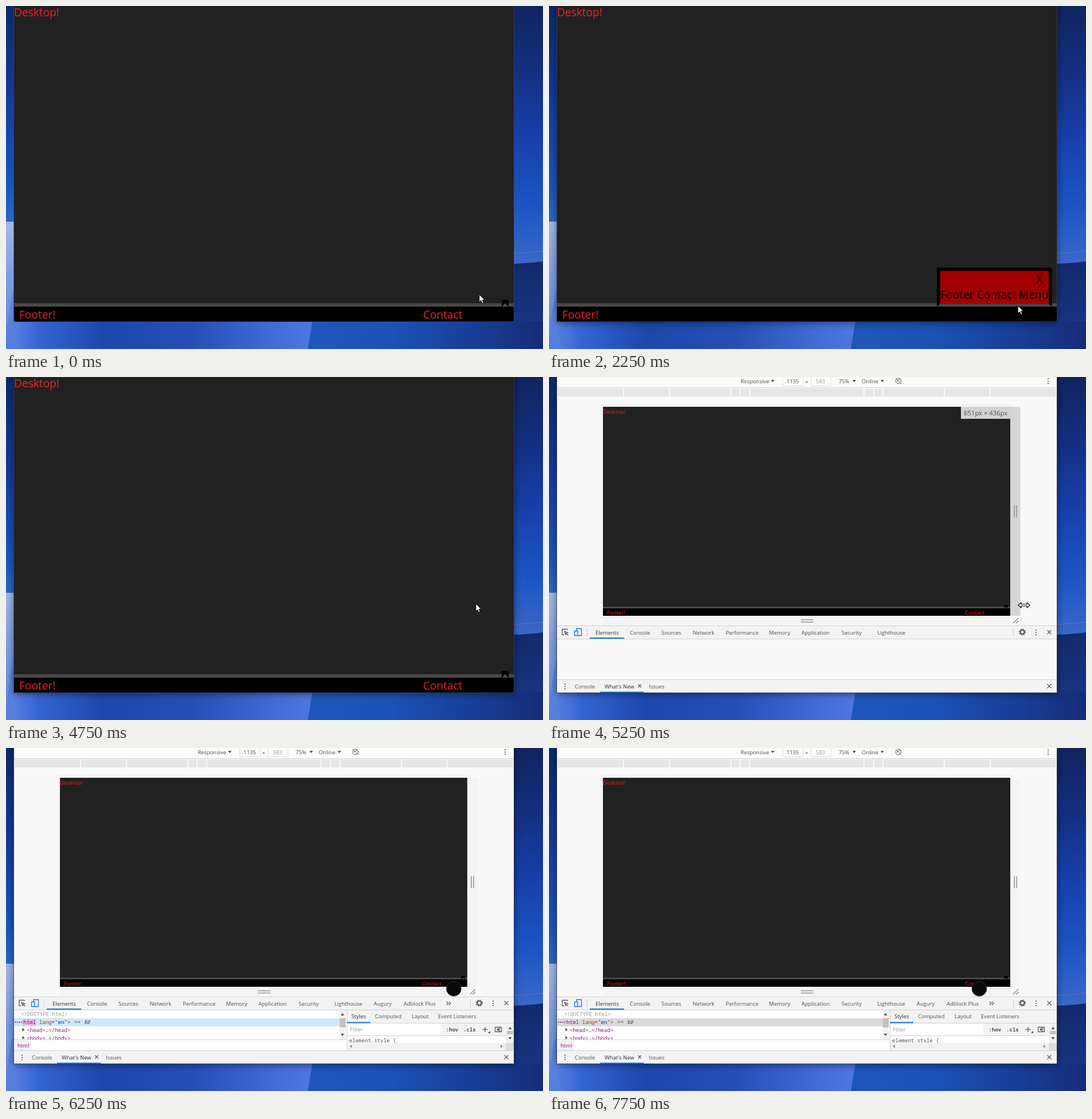
An HTML page that plays this animation: 936x599 px, repeating every 8 s.

```html
<!DOCTYPE html>
<html lang="en">
<head>
<meta charset="utf-8">
<title>Footer menu</title>
<style>
  html, body { margin: 0; width: 100%; height: 100%; overflow: hidden; background: #1c4cae; }
  svg { display: block; width: 936px; height: 599px; }
  text { font: 9.45px "Open Sans", "Noto Sans", sans-serif; fill: #505050; white-space: pre; }
  .page text { font-size: 19.1px; fill: #e9222a; }
  .page .menu text { fill: #000; }
  text.mono { font: 9.1px "Noto Sans Mono", "DejaVu Sans Mono", monospace; }
  text.size { font-size: 11.3px; fill: #555; }
  text.dark { fill: #303030; }
  text.pale { fill: #999; }
  text.bold { font-weight: 700; }
  .tag { fill: #881280; } .attr { fill: #994500; } .value { fill: #1a1aa6; }
  .line { stroke: #d0d0d0; fill: none; }
  .icon { stroke: #606060; fill: none; stroke-width: 1.3; }
</style>
</head>
<body>
<svg viewBox="0 0 936 599">
  <defs>
    <linearGradient id="left" x2="0" y2="1">
      <stop stop-color="#10296b"/><stop offset=".25" stop-color="#15399b"/>
      <stop offset=".52" stop-color="#1b55b7"/><stop offset=".628" stop-color="#2d67c3"/>
      <stop offset=".63" stop-color="#a3b7e8"/><stop offset=".78" stop-color="#839fdf"/>
      <stop offset="1" stop-color="#5c83e2"/>
    </linearGradient>
    <linearGradient id="bottom">
      <stop stop-color="#6288e4"/><stop offset=".06" stop-color="#3565d4"/>
      <stop offset=".18" stop-color="#1d47ab"/><stop offset=".35" stop-color="#264fb6"/>
      <stop offset=".5" stop-color="#426cd6"/><stop offset=".565" stop-color="#4d77df"/>
      <stop offset=".6" stop-color="#1f56ba"/><stop offset=".72" stop-color="#1c51b5"/>
      <stop offset=".86" stop-color="#18409a"/><stop offset="1" stop-color="#152c76"/>
    </linearGradient>
    <linearGradient id="right" x2="0" y2="1">
      <stop stop-color="#11245f"/><stop offset=".25" stop-color="#132f80"/>
      <stop offset=".5" stop-color="#173fa9"/><stop offset=".78" stop-color="#1c55c4"/>
      <stop offset="1" stop-color="#3c68c8"/>
    </linearGradient>
    <linearGradient id="corner" x2="0" y2="1">
      <stop stop-color="#14296c"/><stop offset="1" stop-color="#183581"/>
    </linearGradient>
    <filter id="blur" x="-10%" y="-10%" width="120%" height="120%"><feGaussianBlur stdDeviation="7"/></filter>
    <clipPath id="tree"><path d="M14 458H885V509H14Z"/></clipPath>
    <clipPath id="styles"><path d="M595 503H872V515H595Z"/></clipPath>
  </defs>

  <rect width="936" height="599" fill="url(#bottom)"/>
  <path d="M534 551L526 599H560V551Z" fill="#1f56ba"/>
  <rect width="14" height="599" fill="url(#left)"/>
  <path d="M14 490Q6 525 0 575V599H14Z" fill="#4d78dd" opacity=".55"/>
  <rect x="885" width="51" height="451" fill="url(#right)"/>
  <path d="M885 432Q912 431 936 428" stroke="#5a82d8" fill="none" opacity=".7"/>
  <path d="M885 450Q912 449 936 446V551H885Z" fill="url(#corner)"/>
  <rect id="shadow" x="14" y="-20" width="871" height="573" opacity=".5" filter="url(#blur)"/>
  <g id="browser"></g>
  <g id="devtools"></g>
  <g id="cursor">
    <path id="arrow" d="M0 0V13L3 10.3L5 15L7.2 14L5.2 9.5H9Z" fill="#fff" stroke="#000" stroke-width=".8"/>
    <path id="resize" d="M-10 0L-5 -4.5V-1.5H5V-4.5L10 0L5 4.5V1.5H-5V4.5Z" fill="#fff" stroke="#000" stroke-width="1.1"/>
    <circle id="touch" r="12.8" fill="#080808" stroke="#303030" stroke-width="1"/>
  </g>
</svg>
<script>
const $ = id => document.getElementById(id);
const text = (x, y, s, cls = "") => `<text x="${x}" y="${y}" class="${cls}">${s}</text>`;
const box = (x, y, w, h, fill, extra = "") => `<rect x="${x}" y="${y}" width="${w}" height="${h}" fill="${fill}" ${extra}/>`;
const path = (d, cls, extra = "") => `<path d="${d}" class="${cls}" ${extra}/>`;
const labels = (y, items, cls) => items.map(([x, s]) => text(x, y, s, cls)).join("");
const triangle = (x, y, dx, dy) => // small arrow head pointing along dx, dy
  path(`M${x + dx * 2} ${y + dy * 2}L${x - dx * 2 - dy * 3} ${y - dy * 2 - dx * 3}L${x - dx * 2 + dy * 3} ${y - dy * 2 + dx * 3}Z`, "", 'fill="#505050"');
const dots = (x, y) => [-4, 0, 4].map(d => `<circle cx="${x}" cy="${y + d}" r="1.1" fill="#555"/>`).join("");
const cross = (x, y, r) => path(`M${x - r} ${y - r}l${2 * r} ${2 * r}m0 ${-2 * r}l${-2 * r} ${2 * r}`, "icon");

// The web page itself, drawn in its own units with the origin at its top left.
function page(x, y, width, height, scale, footerX, menu = "") {
  const bar = height - 32;
  return `<g class="page" transform="translate(${x} ${y}) scale(${scale})">
    ${box(0, 0, width, height, "#212121")}
    ${box(0, bar, width, 6, "#484848")}${box(0, bar + 6, width, 26, "#000")}
    ${text(0, 23, "Desktop!")}${text(footerX, height - 5, "Footer!")}
    <g class="toggle">${text(width - 158, height - 5, "Contact")}
      ${box(width - 21, bar - 6, 12, 12, "#000")}
      ${path(`M${width - 20.5} ${bar + 6}l5.5 -6l5.5 6Z`, "", 'fill="#505050"')}</g>
    ${menu}</g>`;
}

const menu = `<g class="menu" id="menu" transform="translate(-14 5.5)">
  ${box(676, 457, 200.5, 68, "#000")}${box(682, 462.5, 189, 57.5, "#a00000")}
  ${path("M676 525L682 520H871L876.5 525Z", "", 'fill="#484848"')}
  ${text(849.5, 484, "X")}${text(682.5, 511, "Footer Contact Menu")}</g>`;
$("browser").innerHTML = page(14, -5.5, 871, 556.5, 1, 9, menu) +
  path("M13.5 0V551.5H885.5V0", "", 'stroke="#3c4560" fill="none" stroke-width=".7"');

const deviceBar = box(14, 0, 871, 551, "#f9f9f9") + box(14, 0, 871, 18, "#fcfcfc") +
  path("M14 18.5H885", "line") + box(15, 20, 869, 14, "#e6e6e6") +
  path([130, 210, 317, 333, 350, 549, 566, 582, 689, 769].map(x => `M${x} 20v14`).join(""), "", 'stroke="#fff" stroke-width="1.5"') +
  path("M407.5 0V15.5H443.5V0M456.5 0V15.5H491.5V0", "line", 'stroke-opacity=".7"') +
  labels(10.5, [[334, "Responsive"], [414, "1135"], [505, "75%"], [545, "Online"]]) +
  text(465, 10.5, "583", "pale") + text(446.5, 11.5, "×") +
  [390, 532, 581].map(x => triangle(x, 7, 0, 1)).join("") +
  `<circle cx="609" cy="7" r="4.8" class="icon" style="stroke-width:1"/>` +
  path("M604 2l10 10M606 8l5 -5l2 2", "icon", 'style="stroke-width:1"') + dots(870, 7);

const device = box(89, 47, 720, 375, "#f3f3f3") + box(804, 52, 17.5, 365, "#f4f4f4") +
  box(94, 417, 710, 16, "#f4f4f4") +
  `<g id="sizing">${box(804, 52, 17.5, 365, "#d5d5d5")}</g>` +
  page(94, 52, 1420, 730, .5, 14.5) +
  `<g id="sizeLabel">${box(718, 52, 86, 21, "#d2d2d2")}${text(723, 67, "851px × 436px", "size")}</g>` +
  path("M811.2 224v21M815.2 224v21M439 424h22M439 428h22M809 430l9 -9M813.5 430.5l5 -5", "", 'stroke="#969696" stroke-width="1.6"');

const tabs = box(14, 434, 871, 24, "#f3f3f3") + path("M14 434.5H885M14 457.5H885M66.5 439v14M809.5 439v14", "line") +
  box(71, 455, 60, 2, "#1a73e8") + text(81, 449.5, "Elements", "dark") +
  labels(449.5, [[141, "Console"], [196, "Sources"], [250.5, "Network"], [308, "Performance"], [383.5, "Memory"],
    [440, "Application"], [510, "Security"], [572.5, "Lighthouse"]]) +
  path("M32 442V440.5H23V450H26M27 444l6 2.5l-3 1l3.5 3.5M27 444l2 6l1.5 -2.5", "icon") +
  path("M48 443V439.5H56.5V451.5H50M44.5 443.5H50V451.5H44.5Z", "icon", 'style="stroke:#1a73e8"') +
  `<circle cx="825" cy="445.5" r="3.6" class="icon" style="stroke-width:2.4"/>
   <circle cx="825" cy="445.5" r="5.2" class="icon" style="stroke-width:1.8" stroke-dasharray="2 2.08"/>` +
  dots(849, 446) + cross(872, 445.5, 3.5);

const drawer = box(14, 528, 871, 23, "#f3f3f3") + path("M14 528.5H885", "line") + dots(28, 540.5) +
  labels(544, [[45, "Console"], [174, "Issues"]]) + text(97, 544, "What's New", "dark") +
  cross(158, 539.5, 2.7) + cross(872, 540, 3.5) + box(89, 549.5, 76, 1.5, "#1a73e8");

const span = (cls, s) => `<tspan class="${cls}">${s}</tspan>`;
const element = (name, gap) => span("tag", `&lt;${name}&gt;`) + gap + span("tag", `&lt;/${name}&gt;`);
const inspector = `<g id="inspector">
  ${labels(449.5, [[641, "Augury"], [693, "Adblock Plus"]])}
  ${path("M768 443l3 3l-3 3M772 443l3 3l-3 3M835 465.5l3 3l-3 3M839 465.5l3 3l-3 3", "icon")}
  <g clip-path="url(#tree)">${box(14, 458, 580, 51, "#fff")}
    <rect id="selected" x="14" y="472" width="567" height="14"/>
    ${text(26, 468, "&lt;!DOCTYPE html&gt;", "mono pale")}
    ${text(15, 481.5, "•••", "")}
    <rect id="flash" x="29.5" y="473" width="23" height="12" fill="#e9bddd"/>
    ${text(25, 482, span("tag", "&lt;html") + span("attr", " lang") + span("tag", '="') + span("value", "en") + span("tag", '"&gt;'), "mono")}
    ${text(119, 482, '== <tspan font-style="italic">$0</tspan>', "mono")}
    ${triangle(30.5, 492, 1, 0)}${text(36, 496, element("head", "…"), "mono")}
    ${triangle(30.5, 506, 1, 0)}${text(36, 510, element("body", "…"), "mono")}
    ${box(581, 458, 12, 51, "#f1f1f1")}${box(581.5, 472, 10.5, 16, "#c1c1c1")}
    ${triangle(586.5, 465, 0, -1)}${triangle(586.5, 501, 0, 1)}</g>
  ${box(14, 509, 580, 19, "#fff")}${path("M14 509.5H594", "line")}
  ${box(15, 511, 29, 17, "#f1f1f1")}<text x="20" y="523" style="fill:#881280">html</text>
  ${box(594, 458, 291, 70, "#f3f3f3")}${path("M594.5 458V528M594 480.5H885M594 502.5H872", "line")}
  ${box(594, 478.5, 41, 2, "#1a73e8")}${text(602, 472, "Styles", "dark")}
  ${labels(472, [[643, "Computed"], [707, "Layout"], [753, "Event Listeners"]])}
  ${box(595, 481, 162, 21, "#fff")}${text(599.5, 495, "Filter", "pale")}
  ${labels(494.5, [[766.5, ":hov"], [797, ".cls"]], "mono bold")}
  ${path("M830.5 491.5h9M835 487v9M852.5 487.5h11v8h-11ZM860.5 487.5v8", "icon")}
  ${path("M844 494v4h-4Z", "", 'fill="#505050"')}${path("M859 488.5v6l-4 -3Z", "", 'fill="#505050"')}
  ${box(595, 503, 277, 12, "#fff")}<g clip-path="url(#styles)">${text(598, 513.5, "element.style {", "mono")}</g>
  ${box(595, 515, 276, 13, "#f1f1f1")}${box(872, 481, 13, 34, "#f1f1f1")}${box(871, 515, 14, 13, "#dcdcdc")}
  ${box(873, 494, 11, 6, "#c1c1c1")}
  ${triangle(878.5, 489, 0, -1)}${triangle(878.5, 507, 0, 1)}
  <g opacity=".6">${triangle(601, 521, -1, 0)}${triangle(864, 521, 1, 0)}</g>
</g>`;
$("devtools").innerHTML = deviceBar + device + tabs + inspector + drawer;

// time, x, y
const pointer = [
  [0, 825, 504], [1000, 766, 535], [1250, 762, 538], [1750, 772, 538], [2000, 772, 538],
  [2250, 817.5, 523.5], [2500, 846, 492], [2750, 855, 475], [3000, 855, 475], [3250, 845, 468],
  [3500, 806, 445], [3750, 785, 411], [4250, 816, 395], [4500, 816, 395], [4750, 819, 396],
  [5250, 828, 398.5], [5750, 824, 399], [6000, 804, 411], [6250, 780.5, 420.5], [7000, 766, 421],
  [7750, 750, 420.5], [8000, 750, 420.5]
];
function pointerAt(t) {
  const i = pointer.findIndex(k => k[0] > t);
  const [t0, x0, y0] = pointer[i - 1], [t1, x1, y1] = pointer[i];
  const p = (t - t0) / (t1 - t0);
  return [x0 + (x1 - x0) * p, y0 + (y1 - y0) * p];
}
const show = (el, on) => el.style.display = on ? "" : "none";
const pageToggle = document.querySelector("#browser .toggle");

function draw(now) {
  const t = Math.floor(now % 8000 / 250) * 250;
  const between = (a, b) => t >= a && t < b;
  const menuOpen = between(1500, 3000);
  show($("shadow"), t >= 1000);
  show($("menu"), menuOpen);
  show(pageToggle, !menuOpen);
  show($("devtools"), t >= 5000);
  show($("inspector"), t >= 5500);
  show($("sizing"), t < 6000);
  show($("sizeLabel"), t < 6250);
  show($("flash"), t < 6500);
  $("selected").setAttribute("fill", t < 6750 ? "#cfe8fc" : "#dadada");
  show($("arrow"), t < 5000);
  show($("resize"), between(5000, 6000));
  show($("touch"), t >= 6000);
  $("cursor").setAttribute("transform", `translate(${pointerAt(t)})`);
}
const start = performance.now();
function tick() {
  draw(performance.now() - start);
  requestAnimationFrame(tick);
}
tick();
</script>
</body>
</html>
```
